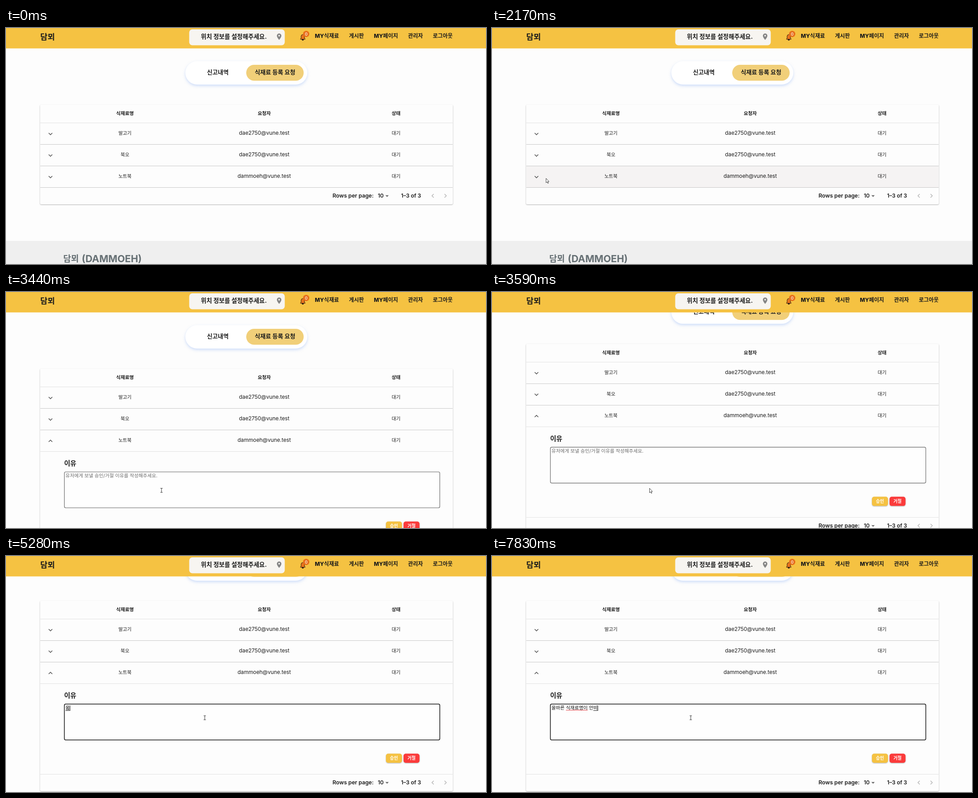
These frames come from a looping animation (1065x526 px, 8 s). An HTML page:

```html
<!DOCTYPE html>
<html lang="ko">
<head>
<meta charset="utf-8">
<title>식재료 등록 요청</title>
<style>
html, body { margin: 0; width: 100%; height: 100%; overflow: hidden; background: #fdfdfd; }
svg { display: block; width: 1065px; height: 526px; font-family: Inter, 'Noto Sans CJK KR', 'Noto Sans CJK', sans-serif; }
text { white-space: pre; }
.line { stroke: #000; stroke-opacity: .11; }
.tabs { filter: drop-shadow(0 3px 3px rgba(160, 190, 245, .5)); }
.paper { filter: drop-shadow(0 1px 1px rgba(0, 0, 0, .3)); }
.button { filter: drop-shadow(0 1px 1px rgba(0, 0, 0, .3)); }
</style>
</head>
<body>
<svg viewBox="0 0 1065 526">
  <defs><clipPath id="panelClip"><rect id="panelWindow" x="70" y="356" width="930" height="0"/></clipPath></defs>
  <rect width="1065" height="526" fill="#fdfdfd"/>
  <g id="page">
    <rect class="tabs" x="398" y="74" width="270.5" height="52" rx="26" fill="#fff"/>
    <rect x="533" y="82" width="127.5" height="35.5" rx="17.7" fill="#f1cf79"/>
    <rect id="paper" class="paper" x="75.5" y="171" width="916" height="222" rx="3" fill="#fdfdfd"/>
    <rect id="hover" x="76" width="915" height="47" fill="#f5f3f3"/>
    <g id="table" fill="none">
      <path class="line" d="M76 211.5H991M76 259.5H991M76 307.5H991M76 355.5H991"/>
      <path class="line" d="M76 259.5H991M76 307.5H991"/>
    </g>
    <g clip-path="url(#panelClip)">
      <g id="panel">
        <rect id="field" x="129.5" y="401" width="833" height="80" rx="3" fill="#fefefe"/>
        <rect class="button" x="843" y="511.5" width="35.5" height="20.5" rx="5" fill="#f5c242"/>
        <rect class="button" x="882" y="511.5" width="35.5" height="20.5" rx="5" fill="#fb3b3b"/>
        <path id="spelling" stroke="#e0393e"/>
        <path id="composing" stroke="#222"/>
        <path id="caret" stroke="#000"/>
      </g>
    </g>
    <g id="below">
      <path class="line" d="M76 355.5H991"/>
      <path d="M841.8 372.8h7.4l-3.7 3.7z" fill="#666"/>
      <path d="M949 370l-4 4 4 4M973 370l4 4-4 4" fill="none" stroke="#adadad" stroke-width="1.3"/>
      <rect y="474.5" width="1065" height="300" fill="#efefef"/>
    </g>
  </g>
  <g id="header">
    <rect width="1065" height="45.5" fill="#f5c242"/>
    <rect x="406.5" y="3" width="212" height="35.5" rx="7" fill="#f7f5f1"/>
    <path d="M606 26.5C603.5 23.2 601 20.300 601 17.200a5 5 0 0 1 10 0C611 20.300 608.5 23.200 606 26.500zM606 15.300a1.800 1.800 0 1 0 .01 0z" fill="#858585" fill-rule="evenodd"/>
    <g stroke="#2a1a10" stroke-linejoin="round">
      <path d="M656.500 25.500a2 2 0 0 0 4 0z" fill="#2a1a10"/>
      <path d="M653 25l1.800-2.600v-4a3.700 3.700 0 0 1 7.400 0v4L664 25z" fill="#ea741c"/>
    </g>
    <circle cx="666" cy="13.300" r="7" fill="#e8701c"/>
  </g>
  <path id="arrow" d="M0 0V10L2.300 7.900 3.900 11.300 5.300 10.700 3.800 7.300H6.600z" fill="#fff" stroke="#333" stroke-width=".9"/>
  <path id="beam" d="M-2.500 -4.500H2.500M0 -4.500V4.500M-2.500 4.500H2.500" fill="none" stroke="#333"/>
</svg>
<script>
const $ = id => document.getElementById(id);
const LOOP = 8000, PANEL = 202, OPEN_AT = 2670, FOCUS_AT = 4190;
const INK = '#1b1b1b';

function add(parent, tag, attrs, content = '') {
  const node = document.createElementNS('http://www.w3.org/2000/svg', tag);
  for (const key in attrs) node.setAttribute(key, attrs[key]);
  node.textContent = content;
  return $(parent).appendChild(node);
}

// Places text by its vertical centre.
function label(parent, x, y, content, size, weight = 400, anchor = 'middle', fill = INK) {
  return add(parent, 'text', {
    x, y: y + size * .37, 'font-size': size, 'font-weight': weight, 'text-anchor': anchor, fill
  }, content);
}

label('header', 76, 19, '담뫼', 17.6, 900, 'start');
label('header', 505.5, 19, '위치 정보를 설정해주세요.', 13.4, 700);
label('header', 666.2, 13.4, '0', 9, 500, 'middle', '#fff');
[[712, 'MY식재료'], [777.5, '게시판'], [843, 'MY페이지'], [908.5, '관리자'], [969, '로그아웃']]
  .forEach(([x, name]) => label('header', x, 18, name, 12, 800));

label('page', 470, 98.5, '신고내역', 13, 700);
label('page', 597, 98.5, '식재료 등록 요청', 13, 700);

const columns = [264, 573, 865.5];
['식재료명', '요청자', '상태'].forEach((name, i) => label('table', columns[i], 190.5, name, 10.6, 700));
const rows = [['말고기', 'dae2750@vune.test'], ['북오', 'dae2750@vune.test'], ['노트북', 'dammoeh@vune.test']];
const chevrons = rows.map(([item, user], i) => {
  const y = 234 + i * 48;
  label('table', columns[0], y, item, 10.6);
  label('table', columns[1], y, user, 11.8);
  label('table', columns[2], y, '대기', 10.6);
  return add('table', 'path', { stroke: '#4c4c4c', 'stroke-width': 1.4 });
});

function drawChevron(i, up) {
  const y = 236 + i * 48, d = up ? -2 : 2;
  chevrons[i].setAttribute('d', `M94.700 ${y - d}L98.700 ${y + d} 102.700 ${y - d}`);
}

label('panel', 129, 382, '이유', 14.7, 700, 'start');
label('panel', 860.7, 521.2, '승인', 9.8, 700, 'middle', '#fff');
label('panel', 899.700, 521.2, '거절', 9.8, 700, 'middle', '#fff');
const hint = label('panel', 132, 409, '유저에게 보낼 승인/거절 이유를 작성해주세요.', 10.6, 400, 'start', '#6c6c6c');
const typed = label('panel', 132, 409, '', 10.5, 400, 'start', '#111');

label('below', 724.5, 373.5, 'Rows per page:', 12.2, 600, 'start');
label('below', 825, 373.5, '10', 12, 600, 'start');
label('below', 876.5, 373.5, '1–3 of 3', 12, 600, 'start');
label('below', 127, 514, '담뫼', 18.8, 700, 'start', '#667074');
label('below', 168, 514, '(DAMMOEH)', 21.6, 700, 'start', '#667074');

const pointerPath = [
  [540, 345, 522], [940, 263, 376], [1300, 130, 327], [1500, 87, 292], [1700, 108, 264], [1850, 110, 264],
  [2170, 120, 335], [2620, 98, 332], [2900, 98, 332], [3440, 345, 442], [3590, 349.500, 437.500],
  [3700, 352, 432], [4150, 441, 360.500]
];
const scrollPath = [[3470, 0], [3590, 55], [3700, 71]];
const typing = [
  [4920, 'ㅇ'], [4970, '오'], [5070, '올'], [5280, '옯'], [5330, '올바'], [5480, '올발'], [5530, '올바르'],
  [5630, '올바른'], [5680, '올바른 '], [6040, '올바른 식'], [6140, '올바른 식재'], [6290, '올바른 식잴'],
  [6440, '올바른 식재료'], [6590, '올바른 식재룜'], [6760, '올바른 식재료며'], [6860, '올바른 식재료명'],
  [7010, '올바른 식재료명ㅇ'], [7110, '올바른 식재료명이'], [7210, '올바른 식재료명이 '],
  [7330, '올바른 식재료명이 ㅇ'], [7430, '올바른 식재료명이 아'], [7530, '올바른 식재료명이 안'],
  [7630, '올바른 식재료명이 안ㅂ'], [7830, '올바른 식재료명이 안비']
];

function along(path, t) {
  const next = path.findIndex(point => point[0] > t);
  if (next === 0) return path[0].slice(1);
  if (next < 0) return path[path.length - 1].slice(1);
  const a = path[next - 1], b = path[next], p = (t - a[0]) / (b[0] - a[0]);
  return a.slice(1).map((v, i) => v + (b[i + 1] - v) * p);
}

const show = (node, visible) => node.setAttribute('visibility', visible ? 'inherit' : 'hidden');
const move = (node, x, y) => node.setAttribute('transform', `translate(${x} ${y})`);
const widthOf = count => count ? typed.getSubStringLength(0, count) : 0;

function drawField(t) {
  const focused = t >= FOCUS_AT;
  $('field').setAttribute('stroke', focused ? '#111' : '#606060');
  $('field').setAttribute('stroke-width', focused ? 1.5 : 1.1);

  const step = typing.filter(([at]) => at <= t).pop();
  const value = step ? step[1] : '';
  if (typed.textContent !== value) typed.textContent = value;
  show(hint, !value);

  const length = value.length, end = 132 + widthOf(length);
  show($('caret'), value || (focused && t < 4670));
  $('caret').setAttribute('d', `M${end + .3} 404V416`);
  show($('composing'), value && !value.endsWith(' '));
  $('composing').setAttribute('d', `M${132 + widthOf(Math.max(0, length - 1))} 415.500H${end}`);
  const checked = length > 9;
  show($('spelling'), checked);
  if (checked) $('spelling').setAttribute('d', `M${132 + widthOf(4)} 414.500H${132 + widthOf(9)}`);
}

function draw(t) {
  const p = Math.min(1, Math.max(0, (t - OPEN_AT) / 280));
  const height = PANEL * p * p * (3 - 2 * p);
  const [scroll] = along(scrollPath, t);
  move($('page'), 0, -scroll);
  move($('below'), 0, height);
  $('paper').setAttribute('height', 222 + height);
  $('panelWindow').setAttribute('height', height);
  rows.forEach((_, i) => drawChevron(i, i === 2 && t >= OPEN_AT));
  drawField(t);

  const [x, y] = along(pointerPath, t);
  const pageY = y + scroll, present = t >= 540;
  const row = Math.floor((pageY - 212) / 48);
  show($('hover'), present && row >= 0 && row < 3);
  $('hover').setAttribute('y', 212 + row * 48);
  const overField = height > 190 && x > 129 && x < 963 && pageY > 401 && pageY < 481;
  for (const id of ['arrow', 'beam']) {
    move($(id), x, y);
    show($(id), present && (id === 'beam') === overField);
  }
}

const start = performance.now();
function tick() {
  draw((performance.now() - start) % LOOP);
  requestAnimationFrame(tick);
}
tick();
</script>
</body>
</html>
```
